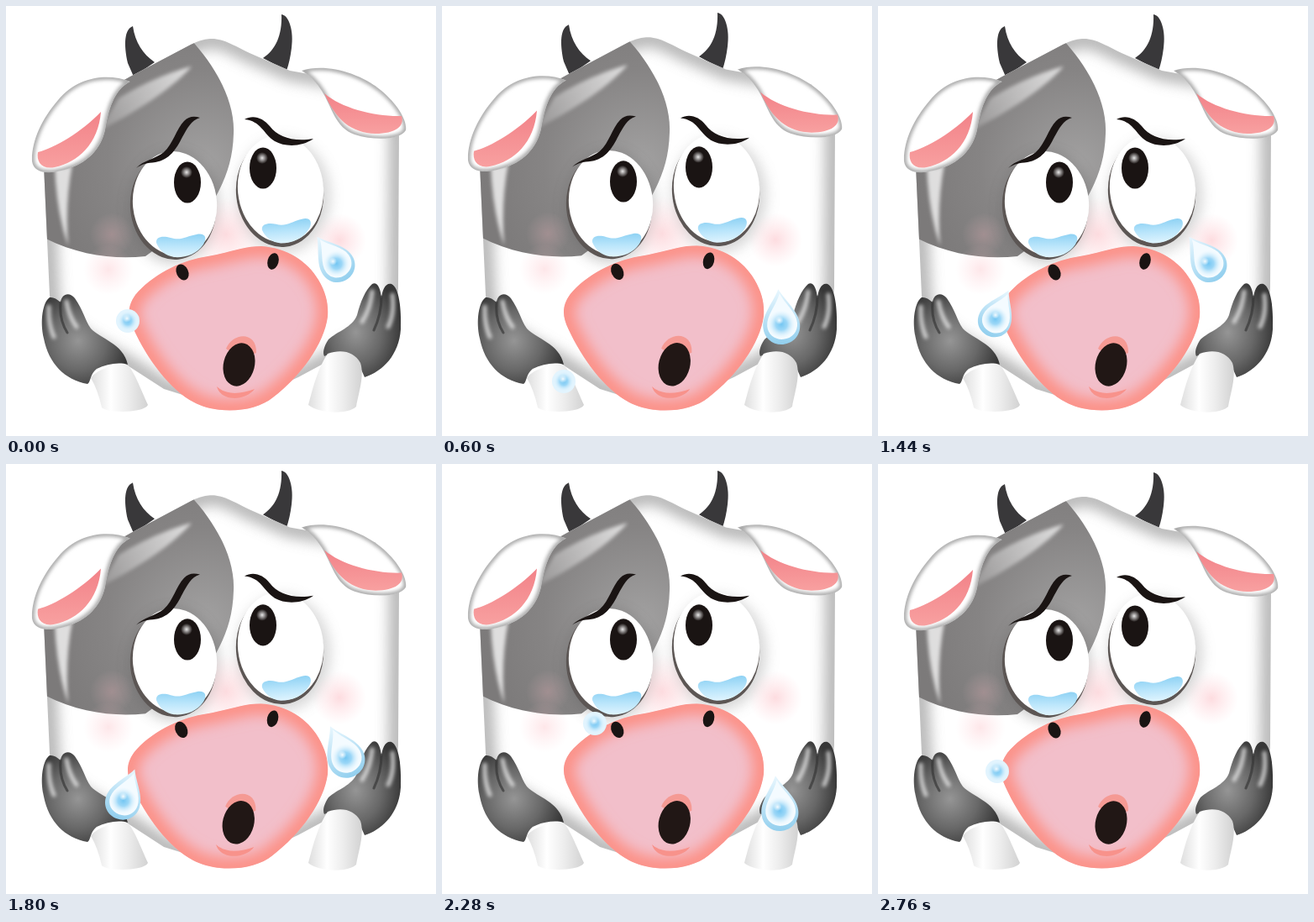
Recreate the animation shown at these times as an HTML page. Size 512x512 px, loop 2880 ms.

```html
<!DOCTYPE html>
<html lang="en">
<head>
<meta charset="utf-8">
<title>Crying cow</title>
<style>
html, body { margin: 0; width: 100%; height: 100%; overflow: hidden; background: #fff; }
svg { display: block; width: 100%; height: 100%; }
.line { fill: none; stroke-linecap: round; }
</style>
</head>
<body>
<svg viewBox="0 0 512 512">
<defs>
  <radialGradient id="patch" gradientUnits="userSpaceOnUse" cx="236" cy="190" r="190">
    <stop offset="0" stop-color="#a2a1a1"/><stop offset=".6" stop-color="#868484"/><stop offset="1" stop-color="#7c7a7a"/>
  </radialGradient>
  <radialGradient id="blush">
    <stop offset="0" stop-color="#fbb9c0" stop-opacity=".5"/><stop offset="1" stop-color="#ffc9d0" stop-opacity="0"/>
  </radialGradient>
  <linearGradient id="streak" gradientUnits="userSpaceOnUse" x1="222" y1="72" x2="112" y2="146">
    <stop offset="0" stop-color="#fff" stop-opacity=".75"/><stop offset="1" stop-color="#fff" stop-opacity=".15"/>
  </linearGradient>
  <linearGradient id="inner" x1="0" y1="0" x2="0" y2="1">
    <stop offset="0" stop-color="#f28288"/><stop offset="1" stop-color="#f8a0a0"/>
  </linearGradient>
  <linearGradient id="pool" x1="0" y1="0" x2="0" y2="1">
    <stop offset="0" stop-color="#8fd2f4"/><stop offset=".5" stop-color="#b9e5fb"/><stop offset="1" stop-color="#dff4fe"/>
  </linearGradient>
  <radialGradient id="hoof" cx=".42" cy=".52" r=".6">
    <stop offset="0" stop-color="#959595"/><stop offset=".55" stop-color="#686868"/><stop offset="1" stop-color="#363636"/>
  </radialGradient>
  <radialGradient id="shine">
    <stop offset="0" stop-color="#fff" stop-opacity=".9"/><stop offset="1" stop-color="#fff" stop-opacity="0"/>
  </radialGradient>
  <linearGradient id="foot">
    <stop offset="0" stop-color="#dedede"/><stop offset=".35" stop-color="#fff"/>
    <stop offset=".65" stop-color="#ededed"/><stop offset="1" stop-color="#d2d2d2"/>
  </linearGradient>
  <linearGradient id="drop" x1="0" y1="0" x2="0" y2="1">
    <stop offset="0" stop-color="#e9f7fe"/><stop offset="1" stop-color="#92cfee"/>
  </linearGradient>
  <radialGradient id="bead">
    <stop offset="0" stop-color="#74c6f2"/><stop offset=".4" stop-color="#92d3f6" stop-opacity=".9"/>
    <stop offset="1" stop-color="#e2f4fd" stop-opacity="0"/>
  </radialGradient>
  <path id="body" d="M243 39C256 38 268 45 290 56L338 77L440 95L468 150L467 335C466 375 440 396 400 414L348 442L265 480L188 456L140 425C85 395 53 380 52 345L45 190L120 104Q136 90 148 84L220 46Q231 40 243 39Z"/>
  <path id="leftEar" d="M148 90C122 80 86 83 62 112C42 135 30 162 31 185C33 199 50 201 70 195C97 188 113 170 118 148C122 125 128 100 148 90Z"/>
  <path id="rightEar" d="M352 77C380 68 420 79 446 100C468 118 478 138 476 148C470 159 440 161 415 153C392 145 388 120 376 101Q366 85 352 77Z"/>
  <path id="nose" d="M235 299C262 295 282 286 304 286C335 288 359 304 372 326C382 343 384 356 383 370C379 402 351 441 318 466C295 485 250 486 224 472C195 457 168 420 152 385C145 370 144 358 154 344C173 321 206 304 235 299Z"/>
  <clipPath id="inBody"><use href="#body"/></clipPath>
  <clipPath id="inLeftEar"><use href="#leftEar"/></clipPath>
  <clipPath id="inRightEar"><use href="#rightEar"/></clipPath>
  <clipPath id="inNose"><use href="#nose"/></clipPath>
  <filter id="soft" x="-60%" y="-30%" width="220%" height="160%"><feGaussianBlur stdDeviation="2"/></filter>
  <filter id="haze" x="-30%" y="-30%" width="160%" height="160%"><feGaussianBlur stdDeviation="8"/></filter>
  <g id="dropShape">
    <path d="M0-41C7-26 22-13 22 3C22 16 12 25 0 25C-12 25-22 16-22 3C-22-13-8-25 0-41Z" fill="url(#drop)"/>
    <path d="M1-36C6-23 19-12 19 1C19 12 11 19 1 19C-9 19-17 12-17 2C-17-11-4-22 1-36Z" fill="#f4fbff"/>
    <circle r="17" cy="1" fill="url(#bead)"/>
    <circle cx="-2" cy="-4" r="5" fill="url(#shine)"/>
  </g>
  <g id="beadShape">
    <circle r="14" fill="#e2f4fe"/><circle r="12" fill="url(#bead)"/><circle cx="-1" cy="-3" r="5" fill="url(#shine)"/>
  </g>
</defs>

<g id="head">
  <path d="M151 24C141 28 140 45 145 68L152 84L177 67C163 57 154 44 151 24Z" fill="#39383a"/>
  <path d="M328 10C337 11 343 30 340 50Q338 66 334 77L306 62C321 52 329 35 328 10Z" fill="#39383a"/>
  <use href="#body" fill="#fff"/>
  <g clip-path="url(#inBody)">
    <use href="#body" class="line" stroke="#a0a0a0" stroke-width="24" opacity=".75" filter="url(#haze)"/>
    <path d="M220 40C248 70 273 112 271 152C270 190 258 214 240 244L166 298C128 302 84 297 40 273L40 40Z" fill="url(#patch)"/>
    <ellipse cx="330" cy="226" rx="56" ry="68" fill="#999" opacity=".4" filter="url(#haze)"/>
    <ellipse cx="200" cy="240" rx="54" ry="66" fill="#555" opacity=".3" filter="url(#haze)"/>
    <path d="M221 72C190 80 156 96 134 110L112 148C150 128 192 104 221 72Z" fill="url(#streak)" filter="url(#soft)"/>
    <path d="M58 190Q70 196 79 188Q70 235 74 286Q60 245 58 190Z" fill="#fff" opacity=".75" filter="url(#soft)"/>
    <circle cx="126" cy="272" r="26" fill="url(#blush)" opacity=".5"/>
    <circle cx="122" cy="314" r="30" fill="url(#blush)" opacity=".7"/>
    <circle cx="262" cy="272" r="45" fill="url(#blush)"/>
    <circle cx="397" cy="279" r="32" fill="url(#blush)"/>
  </g>

  <g clip-path="url(#inLeftEar)">
    <use href="#leftEar" fill="#fff"/>
    <use href="#leftEar" class="line" stroke="#a8a8a8" stroke-width="6" filter="url(#soft)"/>
  </g>
  <path d="M113 126C90 150 58 169 38 174C36 185 42 195 58 192C86 186 110 164 113 126Z" fill="url(#inner)"/>
  <g clip-path="url(#inRightEar)">
    <use href="#rightEar" fill="#fff"/>
    <use href="#rightEar" class="line" stroke="#a8a8a8" stroke-width="6" filter="url(#soft)"/>
  </g>
  <path d="M379 104C400 122 440 132 471 131C475 143 464 152 440 152C411 151 393 136 379 104Z" fill="url(#inner)"/>

  <ellipse cx="199" cy="239" rx="51" ry="63" transform="rotate(-6 199 239)" fill="#5c5654"/>
  <ellipse cx="201" cy="235" rx="50" ry="62" transform="rotate(-6 201 235)" fill="#fff"/>
  <ellipse cx="326" cy="222" rx="52" ry="65" transform="rotate(-6 326 222)" fill="#5c5654"/>
  <ellipse cx="327" cy="218" rx="51" ry="64" transform="rotate(-6 327 218)" fill="#fff"/>
  <g id="pupils"></g>
  <g id="pools"></g>
  <path d="M155 193C163 184 178 182 188 174C199 164 203 146 212 137C218 131 224 131 231 133C220 136 216 146 210 156C203 170 195 183 178 186C168 187 162 188 155 193Z" fill="#1a1413"/>
  <path d="M284 135C294 129 306 133 314 143C324 156 342 162 366 158C352 168 332 168 320 161C306 152 304 137 284 135Z" fill="#1a1413"/>

  <g id="muzzle">
    <g clip-path="url(#inNose)">
      <use href="#nose" fill="#f2bfca"/>
      <use href="#nose" class="line" stroke="#fc9187" stroke-width="26" filter="url(#haze)"/>
    </g>
    <ellipse cx="210" cy="317" rx="7" ry="10" transform="rotate(-25 210 317)" fill="#1a1413"/>
    <ellipse cx="318" cy="304" rx="6.5" ry="10" transform="rotate(15 318 304)" fill="#1a1413"/>
    <path d="M251 453C262 464 280 462 296 456C286 470 256 472 251 453Z" fill="#f8928b"/>
    <path d="M262 408C270 388 299 387 298 413L280 420Z" fill="#f59a94"/>
    <ellipse cx="277.5" cy="427" rx="18.5" ry="26" transform="rotate(14 277.5 427)" fill="#211715"/>
  </g>
</g>

<path d="M52 347C44 352 40 375 45 396C51 426 70 445 97 450C101 448 100 438 108 432C120 426 135 424 145 427C140 402 112 396 101 384C94 374 92 362 82 348C76 340 66 342 65 353Q58 346 52 347Z" fill="url(#hoof)"/>
<path d="M436 331C428 338 422 352 418 368C412 383 395 387 384 397C378 406 377 413 379 417C396 408 412 412 418 422Q423 433 427 442C449 435 468 415 470 385C471 360 468 335 459 331C452 329 448 338 447 348C446 336 442 328 436 331Z" fill="url(#hoof)"/>
<path class="line" d="M65 353Q63 373 73 389M447 346Q447 367 438 386" stroke="#333" stroke-width="3" opacity=".65"/>
<path class="line" d="M51 358Q50 378 57 394M72 352Q75 370 84 382M460 344Q463 366 455 382M436 340Q434 360 424 376" stroke="#f2f2f2" stroke-width="5" opacity=".75" filter="url(#soft)"/>
<path d="M101 443C108 432 135 424 145 428C151 432 160 455 169 475C164 485 120 485 114 478Q109 456 101 443Z" fill="url(#foot)"/>
<path d="M383 414C400 408 415 412 422 425C427 440 420 460 417 477C405 488 370 484 360 475C366 452 372 430 383 414Z" fill="url(#foot)"/>

<use id="rightDrop" href="#dropShape"/>
<use id="leftDrop" href="#dropShape"/>
<use id="leftBead" href="#beadShape"/>
</svg>
<script>
const STEP = 120, COUNT = 24;
const $ = id => document.getElementById(id);

$('pupils').innerHTML = [[216, 210], [306, 193]].map(([x, y]) =>
  `<ellipse cx="${x}" cy="${y}" rx="16" ry="24.5" fill="#1a1413"/>
   <circle cx="${x - 1}" cy="${y - 12}" r="7" fill="url(#shine)"/>`).join('');

$('pools').innerHTML = [[179, 282, 0], [305, 267, -4]].map(([x, y, turn]) =>
  `<path transform="translate(${x} ${y}) rotate(${turn})" fill="url(#pool)"
    d="M0 0C-1-7 7-9 17-6C29-2 36-8 48-10C58-12 61-6 56 2C48 14 34 18 21 17C11 15 4 10 0 0Z"/>`).join('');

// Each key: step, x, y, tilt, scale
const rightPath = [[0, 393, 306, -36, .94], [3, 404, 349, -26, 1], [5, 404, 378, -5, 1], [7, 402, 412, -7, 1], [10, 402, 441, 0, 1]];
const leftPath = [[7, 172, 312, 30, .8], [9, 143, 343, 7, .92], [12, 140, 372, 25, .9], [15, 140, 400, 20, .95], [17, 140, 419, 15, .95]];
const beadPath = [[19, 182, 309, 0, 1], [21, 152, 342, 0, 1], [23, 142, 366, 0, 1], [24, 145, 375, 0, 1], [29, 145, 447, 0, 1]];

function place(id, keys, step) {
  const el = $(id), end = keys.findIndex(k => k[0] >= step);
  const live = end >= 0 && step >= keys[0][0];
  el.style.display = live ? '' : 'none';
  if (!live) return;
  const b = keys[end], a = keys[Math.max(0, end - 1)];
  const f = a === b ? 0 : (step - a[0]) / (b[0] - a[0]);
  const [, x, y, tilt, size] = a.map((v, i) => v + (b[i] - v) * f);
  el.setAttribute('transform', `translate(${x} ${y}) rotate(${tilt}) scale(${size})`);
}

function draw(now) {
  const n = Math.floor(now / STEP) % COUNT;
  const tall = Math.floor(n / 5) % 2;
  $('head').setAttribute('transform', tall ? 'translate(0 480) scale(1 1.004) translate(0 -480)' : '');
  $('muzzle').setAttribute('transform', tall ? 'translate(384 0) scale(1.007 1) translate(-384 0)' : '');
  place('rightDrop', rightPath, n % 12);
  place('leftDrop', leftPath, n);
  place('leftBead', beadPath, n < 7 ? n + COUNT : n);
}

const start = performance.now();
function tick() {
  draw(performance.now() - start);
  requestAnimationFrame(tick);
}
tick();
</script>
</body>
</html>
```
